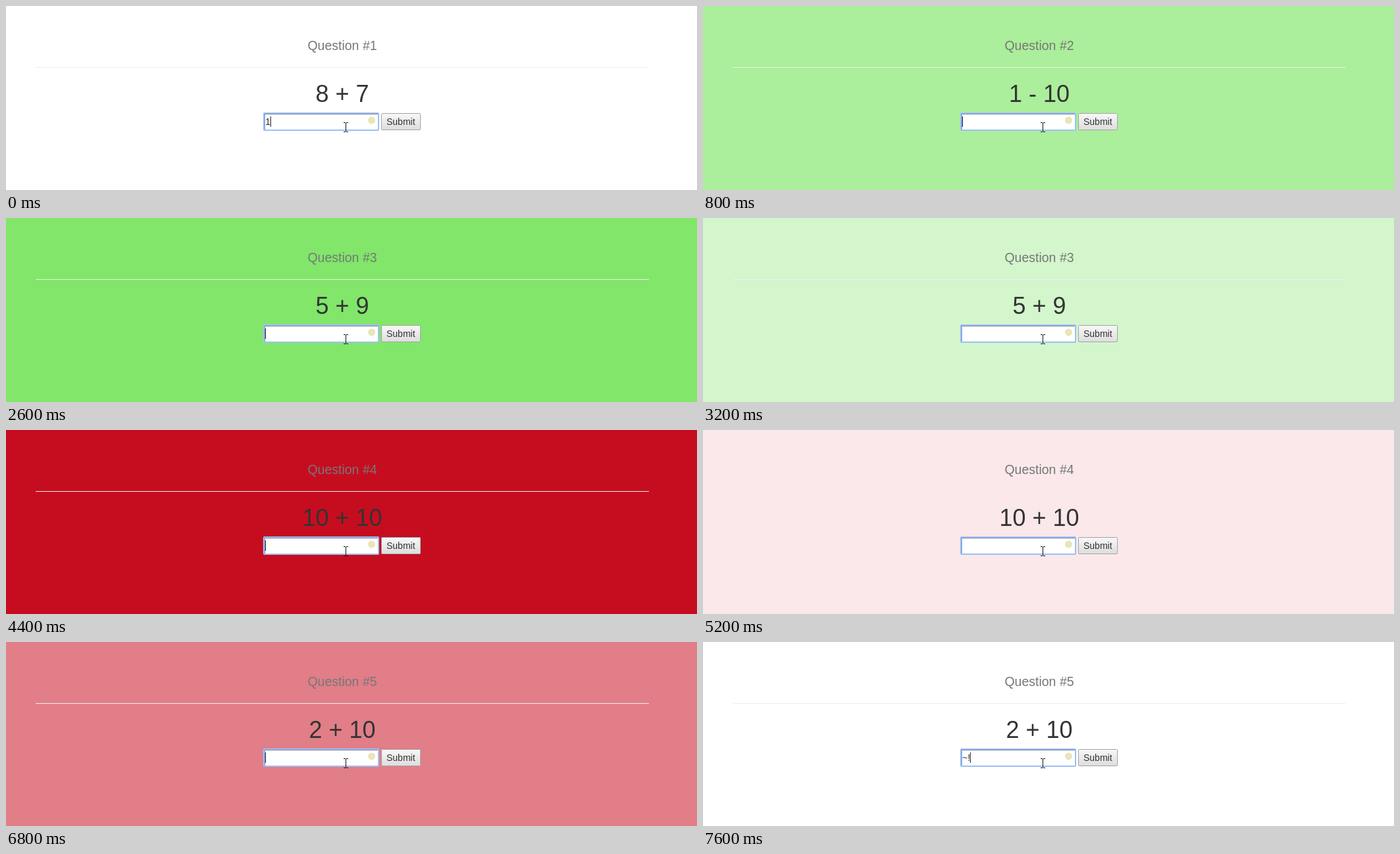
Animation, 1048 px wide and 280 px high, one loop 8000 ms. Source, as an HTML page:

```html
<!DOCTYPE html>
<html lang="en">
<head>
<meta charset="utf-8">
<title>Arithmetic quiz</title>
<style>
  html, body { margin: 0; width: 100%; height: 100%; overflow: hidden; background: #fff; }
  svg { display: block; width: 100%; height: 100%; }
  text { font-family: "Liberation Sans", Arial, sans-serif; font-size: 14px; fill: #333; }
  .heading { font-size: 19.5px; fill: #777; text-anchor: middle; }
  .sum { font-size: 36px; text-anchor: middle; }
  .line { fill: none; stroke-width: 1; }
</style>
</head>
<body>
<svg viewBox="0 0 1048 280">
  <defs>
    <linearGradient id="face" x2="0" y2="1">
      <stop offset="0" stop-color="#f8f8f8"/>
      <stop offset="1" stop-color="#dddddd"/>
    </linearGradient>
  </defs>
  <rect id="flash" width="1048" height="280" fill="#fff"/>
  <text id="heading" class="heading" x="510" y="67"></text>
  <rect x="45" y="93" width="930" height="1" fill="#eee"/>
  <text id="sum" class="sum" x="510" y="146"></text>

  <rect x="391" y="163" width="174" height="26" rx="1" fill="#fff" stroke="#9dbff8" stroke-width="2"/>
  <path class="line" d="M392.5 188V164" stroke="#7296d6"/>
  <path class="line" d="M392 164.5H564" stroke="#7c8295"/>
  <circle cx="554.5" cy="174" r="5.5" fill="#e8e6b9"/>
  <text id="answer" x="393.3" y="181"></text>
  <rect id="caret" y="168" width="1" height="16" fill="#222"/>

  <rect x="569.5" y="163.5" width="59" height="25" rx="1" fill="url(#face)" stroke="#a3a3a3"/>
  <text x="577" y="181">Submit</text>

  <path class="line" d="M512 177.5h3m1 0h3M515.5 178v13M512 191.5h3m1 0h3" stroke="#111"/>
</svg>
<script>
  const LOOP = 8000, STEP = 200, FADE = 1000, BLINK = 530;
  const GREEN = [129, 230, 106], RED = [198, 13, 32];

  // Each question opens with a flash judging the previous answer.
  const questions = [
    { at: 0, sum: "8 + 7" },
    { at: 410, sum: "1 - 10", color: GREEN },
    { at: 2600, sum: "5 + 9", color: GREEN },
    { at: 4400, sum: "10 + 10", color: RED },
    { at: 6320, sum: "2 + 10", color: RED }
  ];
  const typing = [
    [0, "1"], [200, "15"],
    [2000, "-"], [2200, "-9"],
    [3600, "asd"], [3800, "asdasd"], [4000, "asdasdasd"],
    [5600, "1"], [5800, "12"], [6000, "123"], [6200, "1234"],
    [7600, "~!"]
  ];

  const el = id => document.getElementById(id);
  const flash = el("flash"), heading = el("heading"), sum = el("sum");
  const answer = el("answer"), caret = el("caret");

  function background({ at, color }, time) {
    if (!color) return "#fff";
    const progress = Math.min((time - at) / FADE, 1);
    const strength = (1 + Math.cos(Math.PI * progress)) / 2;
    return `rgb(${color.map(c => Math.round(255 - (255 - c) * strength))})`;
  }

  function draw(time) {
    const index = questions.findLastIndex(q => q.at <= time);
    const question = questions[index];
    const [typedAt, value] = typing.findLast(([at]) => at >= question.at && at <= time)
      || [question.at, ""];

    flash.setAttribute("fill", background(question, time));
    heading.textContent = `Question #${index + 1}`;
    sum.textContent = question.sum;
    answer.textContent = value;

    const width = value ? answer.getComputedTextLength() : 0;
    const visible = Math.floor((time - typedAt) / BLINK) % 2 === 0;
    caret.setAttribute("x", Math.round(393.3 + width));
    caret.setAttribute("visibility", visible ? "visible" : "hidden");
  }

  const start = performance.now();
  let shown = -1;
  function tick() {
    const elapsed = (performance.now() - start) % LOOP;
    const time = Math.min(Math.floor(elapsed / STEP) * STEP, 7600);
    if (time !== shown) draw(shown = time);
    requestAnimationFrame(tick);
  }
  tick();
</script>
</body>
</html>
```
